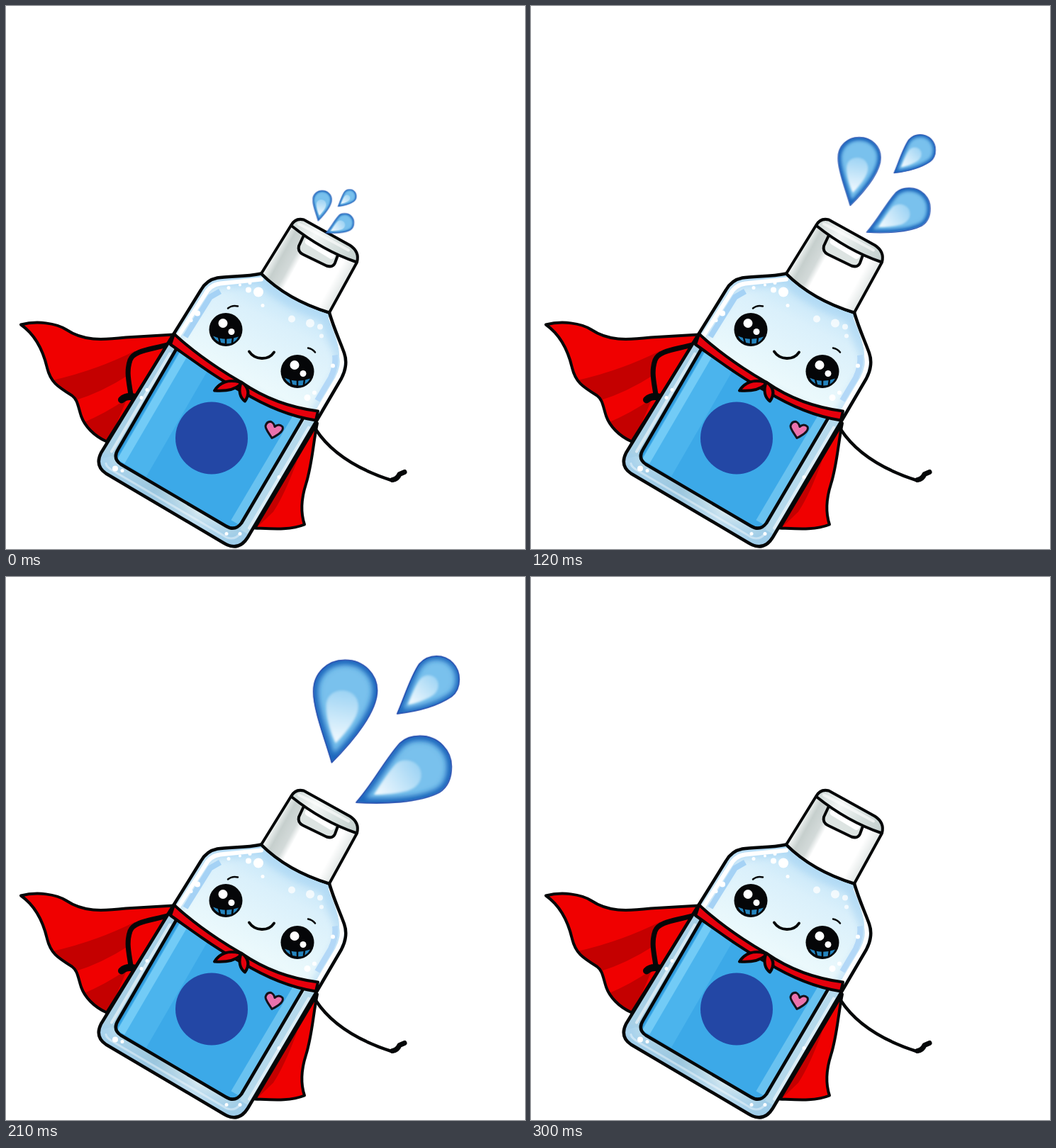
Recreate the animation shown at these times as an HTML page. Size 732 px wide and 766 px high, loop 330 ms.

```html
<!DOCTYPE html>
<html lang="en">
<head>
<meta charset="utf-8">
<title>Flying sanitizer bottle</title>
<style>
  html, body { margin: 0; width: 100%; height: 100%; overflow: hidden; background: #fff; }
  svg { display: block; width: 100vw; height: 100vh; }
  .ink { fill: none; stroke: #050708; stroke-width: 4.5; stroke-linecap: round; stroke-linejoin: round; }
  .lit { fill: none; stroke: #fff; stroke-linecap: round; stroke-linejoin: round; }
  .fine { stroke-width: 4; }
  .rim { fill: none; stroke: #2149ad; stroke-width: 2; stroke-linejoin: round; vector-effect: non-scaling-stroke; }
  .drops { transform-origin: 432px 321.6px; animation: splash 330ms step-end infinite; }
  @keyframes splash {
    0%     { transform: scale(.235); }
    9.09%  { transform: scale(.309); }
    18.18% { transform: scale(.383); }
    27.27% { transform: scale(.452); }
    36.36% { transform: scale(.522); }
    45.45% { transform: scale(.608); }
    54.54% { transform: scale(.694); }
    63.63% { transform: scale(.782); }
    72.72% { transform: scale(.871); }
    81.81% { transform: scale(1); visibility: visible; }
    90.9%, 100% { transform: scale(1); visibility: hidden; }
  }
</style>
</head>
<body>
<svg viewBox="0 0 732 766" preserveAspectRatio="none">
  <defs>
    <linearGradient id="glass" gradientUnits="userSpaceOnUse" x1="390" y1="390" x2="230" y2="710">
      <stop offset="0" stop-color="#bfe3f8"/>
      <stop offset=".15" stop-color="#daf0fb"/>
      <stop offset=".4" stop-color="#ebf9fc"/>
      <stop offset=".55" stop-color="#c3e2f1"/>
      <stop offset="1" stop-color="#a9d0e4"/>
    </linearGradient>
    <linearGradient id="cap" gradientUnits="userSpaceOnUse" x1="382" y1="345" x2="478" y2="398">
      <stop offset="0" stop-color="#eef2f1"/>
      <stop offset=".1" stop-color="#c6cfcd"/>
      <stop offset=".24" stop-color="#d3dad9"/>
      <stop offset=".32" stop-color="#fff"/>
      <stop offset=".82" stop-color="#fff"/>
      <stop offset="1" stop-color="#dde3e2"/>
    </linearGradient>
    <linearGradient id="lid" gradientUnits="userSpaceOnUse" x1="405" y1="305" x2="495" y2="355">
      <stop offset="0" stop-color="#cdd8d6"/>
      <stop offset=".35" stop-color="#f4f7f6"/>
      <stop offset=".65" stop-color="#d9e2e0"/>
      <stop offset="1" stop-color="#c4d0ce"/>
    </linearGradient>
    <linearGradient id="base" gradientUnits="userSpaceOnUse" x1="150" y1="650" x2="320" y2="750">
      <stop offset="0" stop-color="#b5d9ec"/>
      <stop offset=".35" stop-color="#9fc7da"/>
      <stop offset=".7" stop-color="#dcecf1"/>
      <stop offset="1" stop-color="#a7d0e6"/>
    </linearGradient>
    <linearGradient id="gleamA" gradientUnits="userSpaceOnUse" x1="488" y1="115" x2="474" y2="210">
      <stop offset="0" stop-color="#9ed4f4"/><stop offset="1" stop-color="#f4fbff"/>
    </linearGradient>
    <linearGradient id="gleamB" gradientUnits="userSpaceOnUse" x1="622" y1="250" x2="545" y2="302">
      <stop offset="0" stop-color="#9ed4f4"/><stop offset="1" stop-color="#f4fbff"/>
    </linearGradient>
    <linearGradient id="gleamC" gradientUnits="userSpaceOnUse" x1="655" y1="90" x2="605" y2="140">
      <stop offset="0" stop-color="#9ed4f4"/><stop offset="1" stop-color="#f4fbff"/>
    </linearGradient>

    <filter id="soft" x="-20%" y="-20%" width="140%" height="140%"><feGaussianBlur stdDeviation="4.5"/></filter>
    <filter id="haze" x="-20%" y="-20%" width="140%" height="140%"><feGaussianBlur stdDeviation="2.2"/></filter>

    <path id="body" d="M361 377 C338 382 316 380 299 383 Q284 386 276 400 L237 463 L135 630 Q126 648 142 659 L308 757 Q329 770 342 749 L440 583 L474 525 Q484 506 478 489 C472 472 464 456 457 432 Q398 414 361 377Z"/>
    <path id="label" d="M242 482 L159 625 Q151 638 163 646 L311 733 Q324 741 333 729 L420 581 C365 567 310 524 242 482Z"/>
    <path id="capeL" d="M22 449 C45 443 72 447 86 456 C110 472 135 471 170 467 L238 463 L143 614 C125 606 112 592 107 578 C102 562 102 555 94 549 C73 536 64 530 59 510 C53 484 42 463 22 449Z"/>
    <path id="capeR" d="M440 588 C434 617 433 645 424 674 C417 696 417 716 422 731 C402 739 378 737 352 736Z"/>
    <path id="dropA" d="M467 245 C455 203 434 150 434 117 C434 83 460 60 491 60 C525 60 549 86 549 115 C549 152 509 203 467 245Z"/>
    <path id="dropB" d="M511 317 C540 285 563 240 590 210 C601 200 612 197 626 197 C660 197 683 224 683 252 C683 274 675 290 661 299 C625 318 560 320 511 317Z"/>
    <path id="dropC" d="M585 157 C597 130 609 90 625 67 C634 57 645 53 656 53 C680 53 697 72 697 95 C697 110 692 119 683 126 C655 145 620 153 585 157Z"/>
    <clipPath id="inBody"><use href="#body"/></clipPath>
    <clipPath id="inLabel"><use href="#label"/></clipPath>
    <clipPath id="inCapeL"><use href="#capeL"/></clipPath>
    <clipPath id="inCapeR"><use href="#capeR"/></clipPath>
    <clipPath id="inA"><use href="#dropA"/></clipPath>
    <clipPath id="inB"><use href="#dropB"/></clipPath>
    <clipPath id="inC"><use href="#dropC"/></clipPath>

    <g id="eye">
      <circle r="23.5" fill="#050608"/>
      <path d="M-18 9 Q-1 17 18 10 Q13 20 1 20 Q-13 19 -18 9Z" fill="#2584bd"/>
      <path d="M-10 11 L-8 19 M0 12 V21 M10 11 L9 19" stroke="#050608" stroke-width="2.5"/>
      <circle cx="-4" cy="-9" r="6.5" fill="#fff"/>
      <circle cx="8" cy="3" r="4.5" fill="#fff"/>
    </g>
  </defs>

  <rect width="732" height="766" fill="#fff"/>

  <g transform="translate(-1 .5)">
    <!-- cape -->
    <use href="#capeL" fill="#f00000"/>
    <g clip-path="url(#inCapeL)" fill="#c40000">
      <path d="M60 529 Q125 515 183 486 L174 520 Q135 545 98 556 L60 540Z"/>
      <path d="M108 588 Q140 575 172 553 L145 616 L118 602Z"/>
    </g>
    <use href="#capeL" class="ink fine"/>
    <use href="#capeR" fill="#f00000"/>
    <path clip-path="url(#inCapeR)" d="M412 640 Q394 689 378 713 L352 738 L340 730Z" fill="#c40000"/>
    <use href="#capeR" class="ink fine"/>

    <!-- arms -->
    <path class="ink" d="M230 477 C207 484 181 485 176 499 C170 516 175 532 177 548" style="stroke-width:7"/>
    <path class="ink" d="M164 555 Q170 549 181 551" style="stroke-width:10"/>
    <path class="ink" d="M438 597 C461 632 502 655 546 669"/>
    <path class="ink" d="M546 668 Q553 667 556 660 L563 657" style="stroke-width:7"/>

    <!-- bottle -->
    <use href="#body" fill="url(#glass)"/>
    <g clip-path="url(#inBody)">
      <path d="M128 640 L160 632 L322 728 L350 750 L320 775Z" fill="url(#base)"/>
      <use href="#body" fill="none" stroke="#8fc6ef" stroke-width="30" opacity=".35" filter="url(#soft)"/>
      <path class="lit" d="M361 385 L303 391 Q289 393 282 406 L244 465" stroke-width="6"/>
      <path class="lit" d="M459 440 Q475 477 474 494 Q477 508 468 525 L440 572" stroke-width="6"/>
      <path d="M303 402 L289 410 L254 466" fill="none" stroke="#a5d2f5" stroke-width="8" stroke-linejoin="round"/>
      <path d="M465 492 Q467 507 459 524 L440 556" fill="none" stroke="#b3d8f7" stroke-width="8"/>
      <path d="M236 475 L145 632" fill="none" stroke="#a8d0e6" stroke-width="16"/>
      <path d="M434 580 L338 742" fill="none" stroke="#b4d9ec" stroke-width="16"/>
      <path class="lit" d="M232 490 L150 628 M428 594 L344 736" stroke-width="4" opacity=".55"/>
      <path class="lit" d="M142 645 Q143 650 150 654 L307 746 Q321 756 331 744" stroke-width="3" opacity=".4"/>
    </g>
    <use href="#label" fill="#3ca9e8"/>
    <g clip-path="url(#inLabel)" fill="none">
      <path d="M276 486 L180 652" stroke="#4bb4ed" stroke-width="44"/>
      <path d="M253 488 L163 642" stroke="#72cbf6" stroke-width="12"/>
      <path d="M242 482 L153 634" stroke="#2e9adb" stroke-width="10"/>
      <path d="M414 576 L324 728" stroke="#69c2f0" stroke-width="13"/>
    </g>
    <path class="ink" d="M242 482 L159 625 Q151 638 163 646 L311 733 Q324 741 333 729 L420 581"/>
    <use href="#body" class="ink"/>

    <g fill="#fff">
      <circle cx="357" cy="403" r="7"/><circle cx="343" cy="400" r="4"/>
      <circle cx="345" cy="390" r="2.5"/><circle cx="331" cy="393" r="2"/>
      <circle cx="315" cy="397" r="2.5"/><circle cx="363" cy="422" r="2.5"/>
      <circle cx="271" cy="433" r="4"/><circle cx="262" cy="443" r="2.5"/>
      <circle cx="462" cy="507" r="3"/><circle cx="436" cy="545" r="3"/>
      <circle cx="426" cy="552" r="4.5"/><circle cx="200" cy="541" r="2.5"/>
      <circle cx="192" cy="552" r="2.5"/><circle cx="155" cy="652" r="4"/>
      <circle cx="165" cy="655" r="2.5"/><circle cx="386" cy="664" r="2.5"/>
      <circle cx="312" cy="744" r="2.5"/><circle cx="331" cy="744" r="2.5"/>
      <g opacity=".75">
        <circle cx="404" cy="441" r="5"/><circle cx="430" cy="447" r="6"/>
        <circle cx="444" cy="452" r="4"/><circle cx="446" cy="465" r="3"/>
      </g>
    </g>

    <!-- scarf -->
    <g fill="#e6000c" stroke="#080506" stroke-width="4" stroke-linejoin="round">
      <path d="M238 462 C268 490 301 512 334 531 C366 553 402 566 441 571 L438 584 C398 578 364 562 333 543 C299 525 267 501 233 477Z"/>
      <path d="M331 530 C314 526 303 530 295 542 C309 543 322 542 331 534Z"/>
      <path d="M333 530 C328 542 331 552 338 557 C345 547 344 538 333 530Z"/>
    </g>

    <!-- face -->
    <use href="#eye" x="311" y="456"/>
    <use href="#eye" x="412" y="515"/>
    <path class="ink fine" d="M344 487 C352 499 371 500 379 488"/>
    <path class="ink" d="M314 426 Q320 421 328 423 M427 482 Q433 483 437 488" style="stroke-width:2.5"/>

    <!-- emblem and heart -->
    <circle cx="291" cy="609" r="51" fill="#2347a5"/>
    <path d="M376 609 C372 602 367 597 367 592 Q369 585 375 586 Q379 588 380 593 Q386 588 391 593 Q394 600 376 609Z" fill="#ea72ad" stroke="#15121b" stroke-width="3" stroke-linejoin="round"/>

    <!-- cap -->
    <path d="M403 309 L361 377 Q398 414 457 432 L496 362Z" fill="url(#cap)"/>
    <path d="M403 309 Q409 298 421 301 L486 337 Q500 346 496 361 Q448 345 403 309Z" fill="url(#lid)"/>
    <path class="lit" d="M414 307 Q442 321 484 344" stroke-width="4" opacity=".6"/>
    <path d="M421 323 L414 338 Q412 346 420 350 L453 366 Q462 369 465 362 L469 351Z" fill="#dde4e2"/>
    <path class="lit" d="M427 332 L460 352" stroke-width="9"/>
    <path class="ink fine" d="M403 309 L361 377 Q398 414 457 432 L496 361 Q500 346 486 337 L421 301 Q409 298 403 309 Q448 345 496 361 M421 323 L414 338 Q412 346 420 350 L453 366 Q462 369 465 362 L469 351"/>
  </g>

  <!-- splash -->
  <g class="drops">
    <g clip-path="url(#inA)">
      <use href="#dropA" fill="#79c1ed"/>
      <use href="#dropA" fill="none" stroke="#1c68bd" stroke-width="17" filter="url(#soft)"/>
      <path d="M474 210 C465 192 457 165 457 143 C457 125 470 115 486 115 C504 115 515 128 515 144 C515 163 494 190 474 210Z" fill="url(#gleamA)" filter="url(#haze)"/>
    </g>
    <g clip-path="url(#inB)">
      <use href="#dropB" fill="#79c1ed"/>
      <use href="#dropB" fill="none" stroke="#1c68bd" stroke-width="17" filter="url(#soft)"/>
      <path d="M543 303 C555 284 569 262 582 248 C598 234 624 242 628 262 C631 279 620 291 604 296 C585 301 562 303 543 303Z" fill="url(#gleamB)" filter="url(#haze)"/>
    </g>
    <g clip-path="url(#inC)">
      <use href="#dropC" fill="#79c1ed"/>
      <use href="#dropC" fill="none" stroke="#1c68bd" stroke-width="13" filter="url(#soft)"/>
      <path d="M604 141 C610 125 618 105 626 95 C637 82 656 87 659 102 C661 115 652 123 642 128 C630 134 617 139 604 141Z" fill="url(#gleamC)" filter="url(#haze)"/>
    </g>
    <use href="#dropA" class="rim"/>
    <use href="#dropB" class="rim"/>
    <use href="#dropC" class="rim"/>
  </g>
</svg>
</body>
</html>
```
